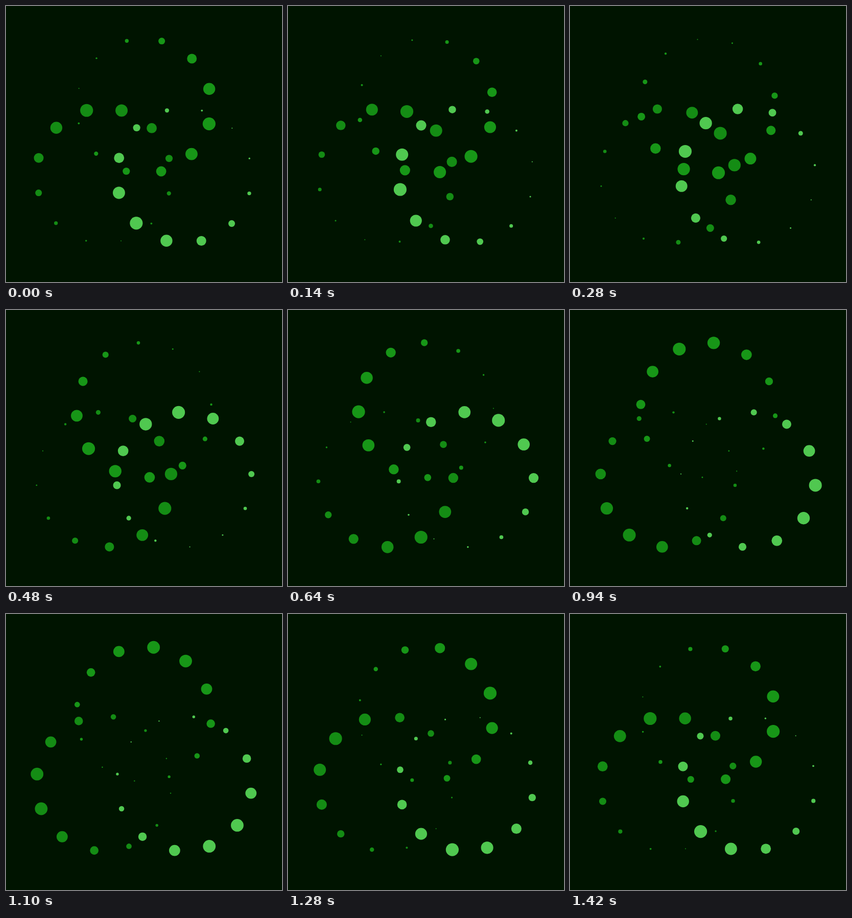
An HTML page with a canvas for the animation above (1.44 s loop, 540 px wide and 540 px high).

```html
<!DOCTYPE html>
<html lang="en">
<head>
<meta charset="utf-8">
<title>Three pulsing rings</title>
<style>
  html, body { margin: 0; width: 100%; height: 100%; overflow: hidden; background: #001400; }
  canvas { display: block; width: 540px; height: 540px; }
</style>
</head>
<body>
<canvas id="stage" width="540" height="540"></canvas>
<script>
const ctx = document.getElementById('stage').getContext('2d');

const LOOP = 1440;
const LEAD = 10;
const DOTS = 12;
const STEP = 2 * Math.PI / DOTS;
const RING = 132;
const MEAN = 6.8;
const SWING = 5.8;

// peak: index of the largest dot when the loop starts
const rings = [
  { x: 270, y: 195.9, color: '#179617', peak: 4 },
  { x: 191.4, y: 331.9, color: '#148c14', peak: 0 },
  { x: 348.6, y: 331.9, color: '#50c850', peak: 8 }
];

function drawRing({ x, y, color, peak }, p) {
  ctx.fillStyle = color;
  for (let i = 0; i < DOTS; i++) {
    // Each loop turns the ring by one dot and moves the pulse by eleven.
    const angle = (i - 0.5 + p) * STEP;
    const r = MEAN + SWING * Math.cos((i - peak - (DOTS - 1) * p) * STEP);
    ctx.beginPath();
    ctx.arc(x + RING * Math.sin(angle), y - RING * Math.cos(angle), r, 0, 2 * Math.PI);
    ctx.fill();
  }
}

function draw(ms) {
  const p = ((ms + LEAD) % LOOP) / LOOP;
  ctx.fillStyle = '#001400';
  ctx.fillRect(0, 0, 540, 540);
  rings.forEach(ring => drawRing(ring, p));
}

const start = performance.now();
function tick() {
  draw(performance.now() - start);
  requestAnimationFrame(tick);
}
tick();
</script>
</body>
</html>
```
